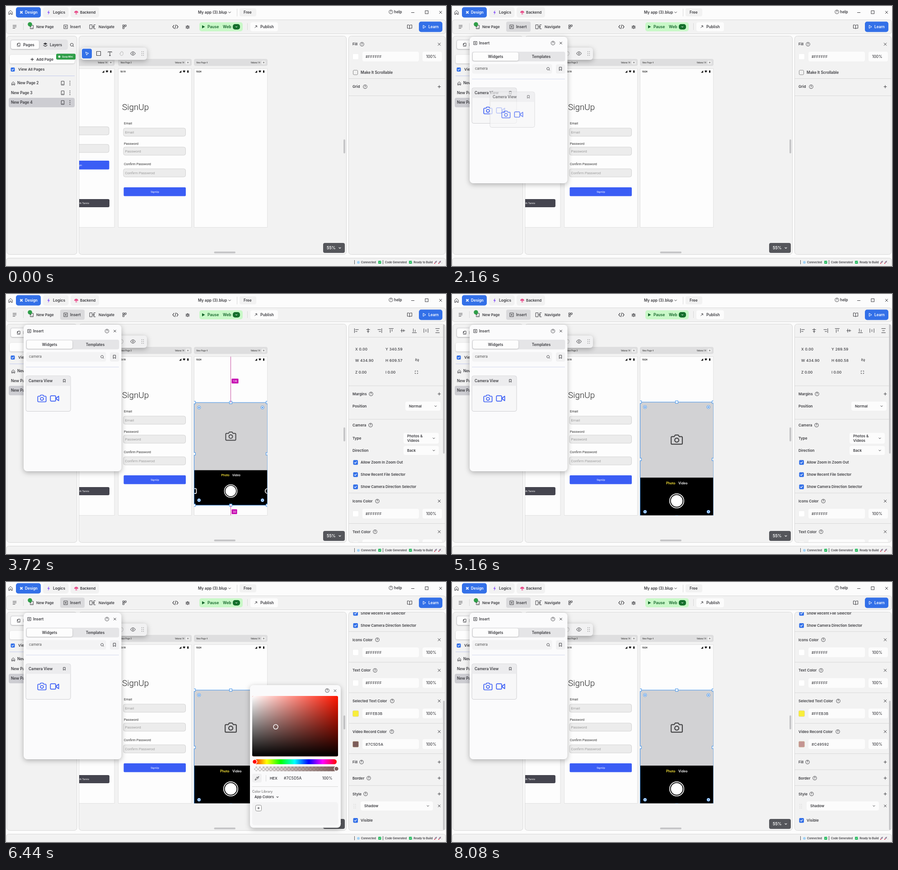
An HTML page that plays this animation: 974x575 px, repeating every 8120 ms.

```html
<!DOCTYPE html>
<html lang="en">
<head>
<meta charset="utf-8">
<title>App builder: camera view</title>
<style>
html, body { margin: 0; width: 100%; height: 100%; overflow: hidden; background: #fcfcfc; }
svg { display: block; width: 974px; height: 575px; font-family: Inter, sans-serif; }
text { white-space: pre; }
.app { font-family: Roboto, sans-serif; }
.float { filter: drop-shadow(0 3px 6px rgba(0, 0, 0, .28)); }
.lift { filter: drop-shadow(0 1px 1.5px rgba(0, 0, 0, .2)); }
</style>
</head>
<body>
<svg id="stage" viewBox="0 0 974 575"></svg>
<script>
const LOOP = 8120, BLUE = '#3370e8', ACTION = '#3a5df5', INK = '#3c3c40', PANEL = '#f2f2f2', EDGE = '#d8d8d8';

const PATHS = {
  home: 'M3 11L12 3l9 8v11h-6v-7H9v7H3z',
  x: 'M4 4L20 20M20 4L4 20',
  plus: 'M12 3v18M3 12h18',
  down: 'M4 8l8 8 8-8',
  camera: 'M23 19a2 2 0 0 1-2 2H3a2 2 0 0 1-2-2V8a2 2 0 0 1 2-2h4l2-3h6l2 3h4a2 2 0 0 1 2 2zM12 9a4 4 0 1 0 .1 0z',
  video: 'M3 5h10a2 2 0 0 1 2 2v10a2 2 0 0 1-2 2H3a2 2 0 0 1-2-2V7a2 2 0 0 1 2-2zM15 12l8-6v12z',
  phone: 'M6 1h12a2 2 0 0 1 2 2v18a2 2 0 0 1-2 2H6a2 2 0 0 1-2-2V3a2 2 0 0 1 2-2zM9 18h6',
  mark: 'M5 2h14v20l-7-6-7 6z',
  search: 'M11 3a8 8 0 1 0 .1 0zM17 17l5 5',
  code: 'M7 5L1 12l6 7M17 5l6 7-6 7M14 3l-4 18',
  insert: 'M2 2h20v20H2zM12 7v10M7 12h10',
  page: 'M8 8V3h12v18H4V14M1 9h9M5 5v9M11 17h4',
  eye: 'M1 12q11-16 22 0q-11 16-22 0zM12 9a3 3 0 1 0 .1 0z',
  menu: 'M3 5h18M3 12h18M3 19h12',
  nav: 'M1 5h9v14H1zM22 5h-6v14h6M10 12h7M14 8l4 4-4 4',
  blocks: 'M4 3h7v7H4zM14 3h7v7h-7zM4 13h7v8H4zM14 13h3',
  bug: 'M7 9h10v8a5 5 0 0 1-10 0zM8 9a4 4 0 0 1 8 0M2 7l5 4M22 7l-5 4M1 14h6M23 14h-6M2 21l5-4M22 21l-5-4M12 10v11',
  arrow: 'M4 20L20 4M8 4h12v12',
  book: 'M12 5q-4-3-11-2v16q7-1 11 2q4-3 11-2V3q-7-1-11 2v16',
  box: 'M3 3h18v18H3z',
  pointer: 'M4 3l16 7-7 3-3 7z',
  type: 'M3 6V3h18v3M12 3v18M8 21h8',
  hand: 'M6 13V7q2-2 3 0V4q2-2 3 0v-1q2-2 3 0v3q2-2 4 0v10q-2 6-8 6q-4 0-6-5l-3-4q1-2 4 0',
  link: 'M10 8H7a4 4 0 0 0 0 8h3M14 8h3a4 4 0 0 1 0 8h-3M4 3l16 18',
  expand: 'M2 8V2h6M16 2h6v6M22 16v6h-6M8 22H2v-6',
  pipette: 'M3 21l2-6 8-8 4 4-8 8zM11 5l8 8M16 7l4-4 2 2-4 4'
};
const ALIGN = ['M2 1v22M6 7h16M6 16h10', 'M12 1v22M3 7h18M6 16h12', 'M22 1v22M2 7h16M8 16h10', 'M1 2h22M7 6v16M16 6v10',
  'M1 12h22M7 3v18M16 6v12', 'M1 22h22M7 2v16M16 8v10', 'M2 2v20M22 2v20M12 6v12', 'M2 2h20M2 22h20M6 12h12'];

const rect = (x, y, w, h, fill, r = 0, stroke = 'none', more = '') =>
  `<rect x="${x}" y="${y}" width="${w}" height="${h}" rx="${r}" fill="${fill}" stroke="${stroke}" ${more}/>`;
const dot = (x, y, r, fill, stroke = 'none', sw = 1, more = '') =>
  `<circle cx="${x}" cy="${y}" r="${r}" fill="${fill}" stroke="${stroke}" stroke-width="${sw}" ${more}/>`;
const shape = (d, fill, more = '') => `<path d="${d}" fill="${fill}" ${more}/>`;
const line = (d, color = EDGE, sw = 1) => shape(d, 'none', `stroke="${color}" stroke-width="${sw}"`);
const text = (x, cy, s, size = 8.2, fill = INK, weight = 600, anchor = 'start', more = '') =>
  `<text x="${x}" y="${(cy + size * .36).toFixed(2)}" font-size="${size}" font-weight="${weight}" fill="${fill}" text-anchor="${anchor}" ${more}>${s}</text>`;
const icon = (name, x, y, size = 9, color = INK, sw = 1) =>
  `<path d="${PATHS[name] || name}" fill="none" stroke="${color}" stroke-width="${sw * 24 / size}" stroke-linejoin="round" transform="translate(${x - size / 2} ${y - size / 2}) scale(${size / 24})"/>`;
const group = (id, body, more = '') => `<g id="${id}" ${more}>${body}</g>`;
const help = (x, y) => dot(x, y, 4.1, 'none', INK, .9) + text(x, y, '?', 6.2, INK, 600, 'middle');
const check = (x, cy, s = 10.5) => rect(x, cy - s / 2, s, s, BLUE, 2) +
  icon('M5 12l5 5 9-10', x + s / 2, cy, s * .85, '#fff', s * .12);
const panel = (x, y, w, h) => rect(x, y, w, h, PANEL, 6, EDGE);
const rule = y => line(`M759 ${y}H972`);
const dots = (x, y) => [-4, 0, 4].map(d => dot(x, y + d, .9, INK)).join('');
const grip = (x, y, color) => [-4, 0, 4].map(d => dot(x - 1.8, y + d, .8, color) + dot(x + 1.8, y + d, .8, color)).join('');

function topBar() {
  return icon('home', 10, 14, 11) +
    rect(22, 2.5, 55, 23, BLUE, 5) + icon('x', 34, 14, 8, '#fff', 2) + text(42, 14, 'Design', 8.3, '#fff') +
    rect(82, 2.5, 56.5, 23, PANEL, 5) + shape('M95.5 9l-4 6h2.5l-1 4.5 4-6h-2.500z', '#8a55f7') + text(104, 14, 'Logics', 8.5) +
    rect(143, 2.5, 63, 23, PANEL, 5) + shape('M151 15a4.500 4.500 0 0 1 9 0z', '#e8508c') + rect(153.5, 15, 4, 4, '#ef9abc', 1) + text(164, 14, 'Backend', 8.2) +
    text(425, 14, 'My app (3).blup', 8.4) + icon('down', 495, 14, 8) + line('M511.500 6v17') +
    rect(517, 5, 37, 18, PANEL, 4) + text(526, 14, 'Free', 8.4) +
    help(852, 13) + text(859, 13, 'help', 8.4) + line('M897 14.500h7', INK) + rect(928, 10.5, 6.5, 6.5, 'none', 0, INK) + icon('x', 962, 14, 9);
}

function toolbar() {
  return panel(.5, 30.5, 973, 31) + icon('menu', 19, 46, 11) + line('M38.500 38v15') +
    rect(120, 34.5, 54, 22.5, '#dadadc', 4, 'none', 'id="insertHover"') +
    icon('page', 57, 46.5, 10) + dot(53, 40.5, 4.8, '#2f9e48') + text(67, 46, 'New Page', 8) +
    icon('insert', 132, 46, 9.5) + text(142, 46, 'Insert', 8.4) +
    icon('nav', 192, 46, 15) + text(205, 46, 'Navigate', 8.2) + icon('blocks', 262, 46, 11) +
    icon('code', 375, 46, 13, INK, 1.2) + icon('bug', 402, 46, 10) +
    rect(428, 36, 96, 20, '#c9f8c8', 5) + shape('M434 42.500l6.500 3.500-6.500 3.500z', '#14652a') + text(446, 46, 'Pause', 8.5, '#14652a') +
    text(480, 46, 'Web', 8.5, '#14652a') + rect(502, 40, 16, 12, '#15702c', 5) + icon('down', 510, 46, 6, '#fff') +
    line('M534.500 38v15') + rect(541, 36, 61, 20, '#fcfcfc', 4) + icon('arrow', 553, 46, 7) + text(563, 46, 'Publish', 8.4) +
    icon('book', 893.5, 46, 11) + rect(914, 34.5, 52, 23, BLUE, 5) +
    icon('M5 3l15 9-15 9z', 926, 46, 9, '#fff') + text(935, 46, 'Learn', 8.3, '#fff');
}

function pageRow(x, cy, name) {
  return text(x, cy, name, 8.3) + icon('phone', 125.5, cy, 9.5) + dots(141.5, cy);
}

function pagesPanel() {
  return panel(2, 66.5, 155, 483) + rect(9, 74, 128, 23, '#e4e4e6', 5) +
    rect(11, 76, 62, 19, '#fdfdfd', 4, 'none', 'class="lift"') + icon('page', 28, 85.5, 9) + text(38, 85.5, 'Pages', 8.4) +
    shape('M87 81l4.500 2.500-4.500 2.500-4.500-2.500zM82.500 86l4.500 2.500 4.500-2.500v1.500l-4.500 2.500-4.500-2.500z', INK) + text(97, 85.5, 'Layers', 8.4) + icon('search', 146, 86, 9.5) +
    rect(8, 108, 144, 19, '#fdfdfd', 4, 'none', 'class="lift"') + icon('plus', 58, 118, 9, INK, 1.3) + text(67, 118, 'Add Page', 8.2) +
    rect(111, 105.5, 43, 13, '#2f9e48', 3) + dot(118, 112, 2.5, '#d9f3df') + text(124, 112, 'Quop Mini', 4.9, '#fff') +
    check(10.5, 140.5, 9) + text(27, 140.5, 'View All Pages', 8.2) + line('M8 154.500H152', '#c3caeb') +
    rect(6, 203, 146, 21, '#cdcdd2', 4) + icon('home', 16, 171, 9) +
    pageRow(25, 170.5, 'New Page 2') + pageRow(11, 192, 'New Page 3') + pageRow(11, 213.5, 'New Page 4');
}

function phone(x, name, time, body = '') {
  const r = x + 162;
  return rect(x, 117.5, 162, 14.5, '#dededf', 3, '#d2d2d2', 'stroke-width=".5"') + text(x + 5, 125, name, 4.6, '#555', 500) +
    text(r - 16, 125, 'Velono 14', 4.6, '#444', 500, 'end') + rect(r - 12.5, 121, 8.5, 8, '#eee', 1.5) + icon('plus', r - 8, 125, 4.5, '#444', .7) +
    rect(x, 138.5, 162, 351, '#fdfdfd', 0, '#dcdcdc', 'stroke-width=".8"') + text(x + 4, 145, time, 4.6, '#111', 700) +
    shape(`M${r - 22.500} 142.500v5h-5zM${r - 19.500} 143.500q3-2 6 0l-3 4zM${r - 9.500} 142.500h3v5h-3z`, '#111') + body;
}

const field = (x, y, w, hint) => rect(x, y, w, 18, '#ececec', 4, '#cbcbcb', 'stroke-width=".8"') + text(x + 3.5, y + 9, hint, 8.1, '#777', 300);

function canvas() {
  const login = field(91, 267, 137, '') + field(91, 306, 137, '') + rect(91, 342, 137.5, 19.5, ACTION, 2) +
    text(168, 352, 'Login', 5.6, '#fff', 400, 'end') + rect(91, 427, 138, 18, '#45454f', 3) + text(184, 436, 'Sign in with Tarvio', 5.7, '#fff', 400, 'end');
  const signup = text(257, 223.5, 'SignUp', 18.9, '#222', 300) +
    [['Email', 259.5, 270, 'Email'], ['Password', 304, 312, 'Password'], ['Confirm Password', 349, 360, 'Confirm Passwrod']]
      .map(([label, cy, y, hint]) => text(261, cy, label, 7.3, '#333', 400) + field(260, y, 137.5, hint)).join('') +
    rect(260.5, 401, 137.5, 19.5, ACTION, 2) + text(329.5, 410.5, 'SignUp', 5.9, '#fff', 400, 'middle');
  return panel(161.5, 66.5, 592, 483) +
    `<g clip-path="url(#canvasClip)" class="app">${phone(78, 'New Page 2', '10:19', login)}${phone(248.7, 'New Page 3', '10:19', signup)}${phone(416.5, 'New Page 4', '10:24')}</g>` +
    widget() +
    rect(747, 295, 4, 31, '#c6c6c8', 2) + rect(460.5, 543, 47.5, 4, '#c6c6c8', 2) +
    `<g class="float">${rect(166, 92, 146, 27, '#f1f1f2', 6)}</g>` + rect(168, 94.5, 22, 21.5, BLUE, 4) + icon('pointer', 179.5, 105.5, 10, '#fff') +
    icon('box', 205, 105, 12, INK, 1.1) + icon('type', 230, 105.5, 11, INK, 1.1) + icon('hand', 256, 105, 11, '#bbb') + icon('eye', 281, 105, 12) + grip(302.5, 105, '#777') +
    rect(702, 524, 48, 22, '#55565b', 4) + text(710, 535, '55%', 8.8, '#fff') + icon('down', 739, 535, 7, '#fff', 1.2);
}

// Preview drawn around its top centre; the whole group scales with height.
function widget() {
  const content = icon('camera', 0, 83, 27, '#48484a', 2.2) +
    text(-3, 179.5, 'Photo', 7.3, '#ffeb3b', 600, 'end') + text(3.5, 179.5, 'Video', 7.3, '#fff') +
    dot(0, 218.5, 15.7, 'none', '#fff', 1.7) + dot(0, 218.5, 13, '#fff') +
    rect(-97, 212.5, 12, 12, 'none', 2, '#fff', 'stroke-width="1.8"') + dot(91, 218.5, 6, 'none', '#fff', 1.8);
  const handles = Array.from({ length: 8 }, () => rect(-2.8, -2.8, 5.6, 5.6, '#fff', 0, '#3d8fe8', 'class="handle"')).join('');
  const pins = Array.from({ length: 4 }, () => `<g class="pin">${dot(0, 0, 3.5, '#fff', '#3d8fe8') + dot(0, 0, 1.6, '#2f7fe0')}</g>`).join('');
  return group('widget', `<g clip-path="url(#pageClip)">
    ${rect(0, 0, 0, 0, '#d2d2d4', 0, 'none', 'id="view"')}${rect(0, 0, 0, 0, '#000', 0, 'none', 'id="bar"')}
    <g clip-path="url(#boxClip)">${group('content', content)}</g>
    ${rect(0, 0, 0, 0, 'none', 0, '#3d8fe8', 'id="frame"')}${handles}${pins}</g>` +
    group('guides', `<path id="guideLines" stroke="#c13b98" stroke-width=".9"/>` + ['topGap', 'endGap'].map(id =>
      group(id, rect(2, -5, 15, 10.5, '#c400ae', 1) + text(0, .3, '', 5.6, '#fff', 500, 'middle'))).join('')));
}

const colorRow = (cy, hex, fill, id = '') =>
  rect(767.5, cy - 6.5, 13, 13, fill, 2, fill === '#fff' ? '#eaeaea' : '#d8c8a0', `stroke-width=".6" ${id && `id="${id}Swatch"`}`) +
  rect(789, cy - 11, 125, 21.5, '#fcfcfc', 4) + text(796, cy, hex, 8.2, INK, 500, 'start', `${id && `id="${id}Hex"`} letter-spacing=".25"`) +
  rect(922, cy - 11, 43, 21.5, '#fcfcfc', 4) + text(930, cy, '100%', 8.3, INK, 500);
const heading = (cy, name, helpX, end) => text(767, cy, name, 8.1) + (helpX ? help(helpX, cy) : '') + (end ? icon(end, 959, cy, 9) : '');
const select = (x, cy, w, label, h = 20) => rect(x, cy - h / 2, w, h, '#fcfcfc', 4) +
  [].concat(label).map((s, i, all) => text(x + 8, cy + (i - (all.length - 1) / 2) * 10.5, s, 8)).join('') + icon('down', x + w - 11, cy, 7);

function pageProps() {
  return heading(84.5, 'Fill', 788, 'x') + colorRow(112, '#FFFFFF', '#fff') +
    rect(768.5, 142, 10, 10, 'none', 2, '#888') + text(785, 147, 'Make It Scrollable', 8.3) + rule(160.5) +
    heading(178.5, 'Grid', 795, 'plus') + rule(198.5);
}

function cameraProps() {
  const value = (id, x, cy) => text(x, cy, '', 8.2, INK, 500, 'start', `id="${id}" letter-spacing=".25"`);
  return ALIGN.map((d, i) => icon(d, 776 + i * 25.6, 81, 11)).join('') + rule(95.5) +
    value('vX', 773, 122) + value('vY', 840, 122) + value('vW', 773, 147.5) + value('vH', 840, 147.5) +
    text(773, 173, 'Z 0.00', 8.2, INK, 500) + text(840, 173, 'I 0.00', 8.2, INK, 500) + icon('link', 910, 146, 10) + icon('expand', 908.5, 173, 7) + rule(203) +
    heading(221, 'Margins', 808, 'plus') + text(767, 248, 'Position', 8.1) + select(884, 248, 78, 'Normal') + rule(277) +
    heading(290, 'Camera', 807) + text(767, 319.5, 'Type', 8.1) + select(880, 319, 78, ['Photos &amp;', 'Videos'], 24) +
    text(767, 346, 'Direction', 8.1) + select(880, 346, 78, 'Back') +
    ['Allow Zoom In Zoom Out', 'Show Recent File Selector', 'Show Camera Direction Selector']
      .map((s, i) => check(768.5, 372.5 + 27 * i) + text(785, 372.5 + 27 * i, s, 7.9)).join('') +
    [['Icons Color', 822, '#FFFFFF', '#fff'], ['Text Color', 817, '#FFFFFF', '#fff'], ['Selected Text Color', 855, '#FFEB3B', '#f8ee3b'],
      ['Video Record Color', 854, '', '#c49592', 'record']].map(([s, hx, hex, fill, id], i) =>
      rule(440 + 67.6 * i) + heading(458 + 67.7 * i, s, hx, 'x') + colorRow(486 + 67.7 * i, hex, fill, id)).join('') +
    rule(710) + heading(728.5, 'Fill', 787, 'plus') + rule(745.5) + heading(764, 'Border', 803, 'plus') + rule(780.5) +
    heading(799, 'Style', 796, 'plus') + grip(772, 826, '#ccc') + select(785, 825.5, 160, 'Shadow') + icon('x', 959, 825.5, 8) +
    check(768.5, 857.5) + text(785, 857.5, 'Visible', 8.2);
}

function cameraCard() {
  return rect(0, 0, 99, 78.5, '#f7f7f8', 4, '#cfcfd2') + shape('M.500 22V4q0-3.500 3.500-3.500H95q3.500 0 3.500 3.500V22z', '#ececee') +
    text(6, 11, 'Camera View', 8.3) + icon('mark', 85, 11, 7.5) + icon('camera', 35.5, 50, 20, ACTION, 1.7) + icon('video', 63.5, 50, 20, ACTION, 1.7);
}

function insertPanel() {
  const dialog = rect(44, 181, 99, 78.5, '#f7f7f8', 4, '#cfcfd2') + shape('M44.500 203V185q0-3.500 3.500-3.500h91q3.500 0 3.500 3.500v18z', '#ececee') +
    text(50, 192, 'Multi choice dialog', 8.3) + icon('mark', 134, 192, 7.5) + shape('M54 259v-46q0-3 3-3h73q3 0 3 3v46z', '#e8e8ea') +
    text(60, 219.5, 'Dialog Title', 6, '#333', 500) + check(58.5, 237, 5) + text(68, 237.2, 'Option 1', 4, '#555', 400) + check(58.5, 252, 5) + text(68, 252.2, 'Option 2', 4, '#555', 400);
  return `<g class="float">${rect(39, 68, 216.5, 324, '#fbfbfc', 8)}</g>` + icon('insert', 51.5, 82, 8.5) + text(60, 82, 'Insert', 8.3) + help(223.5, 82) + icon('x', 241, 82, 8) +
    rect(44, 101, 206.5, 21.5, '#e5e5e7', 4) + rect(46, 102.5, 101, 18.5, '#fdfdfd', 4, 'none', 'class="lift"') +
    text(96.5, 112, 'Widgets', 8.4, INK, 600, 'middle') + text(197.5, 112, 'Templates', 8.3, INK, 600, 'middle') +
    rect(44.5, 128.5, 177, 21, '#f3f3f4', 4, 'none', 'id="searchBox"') + text(51, 138.5, '', 7.9, '#555', 400, 'start', 'id="query"') +
    `<path id="caret" d="M0 134v9.500" stroke="#222" stroke-width=".9"/>` + icon('search', 213, 139, 8.5) +
    rect(230, 129, 20.5, 20.5, '#f1f1f2', 4) + icon('mark', 240, 139, 9) + line('M44 161.500H250', '#d3d8ee') +
    group('dialogCard', dialog) + group('cameraCard', cameraCard());
}

function picker() {
  return `<g class="float">${rect(540, 228, 201, 315.5, '#fafafb', 8)}</g>` + help(711, 240) + icon('x', 728.5, 240.5, 8) +
    rect(545, 252, 190, 133.5, '#f00', 3, 'none', 'id="hueField"') + rect(545, 252, 190, 133.5, 'url(#white)', 3) + rect(545, 252, 190, 133.5, 'url(#black)', 3) +
    dot(0, 0, 5, 'none', '#fff', 1.5, 'id="knob"') + rect(546, 392, 186, 11, 'url(#rainbow)', 5.5) + dot(550.5, 397.5, 5, '#f00', '#fff', 1.5) +
    rect(549, 408, 183, 10.5, 'url(#checker)', 5) + rect(549, 408, 183, 10.5, 'url(#alpha)', 5) + dot(731.5, 413, 5, '#888', '#fff', 1.5, 'id="alphaKnob"') +
    rect(545, 424, 21, 19.5, '#f0f0f1', 4) + icon('pipette', 555.5, 434, 11) + line('M575.500 427v14') + text(584, 434, 'HEX', 8.1) +
    text(615, 434, '', 8.3, INK, 500, 'start', 'id="pickHex" letter-spacing=".25"') + text(700, 434, '100%', 8.3, INK, 500) + line('M545 452.500H735') +
    text(545, 463.5, 'Color Library', 7.3, '#777', 500) + text(550, 475.5, 'App Colors', 8) + icon('down', 601, 475.5, 6.5) +
    rect(545, 487, 190, 51, '#f3f3f4', 5) + rect(552.5, 493.5, 13, 13, '#fcfcfc', 3, '#888') + icon('plus', 559, 500, 7);
}

function statusBar() {
  const done = x => rect(x, 563.5, 6.5, 6.5, '#22b95c', 1) + icon('M4 12l5 6 11-12', x + 3.25, 566.7, 5, '#fff', .9);
  const rocket = x => shape(`M${x + 3} 563.500q-4 0-5 3.500l1.500 1.500q3.500-1 3.500-5z`, '#8d93ab') + dot(x - 2, 569, 1.2, '#e5485c') + dot(x + 1, 566, .8, '#e5485c');
  return panel(.5, 557.5, 973, 19) + line('M771.500 562v9M834.500 562v9', '#555') + dot(780, 567, 3, '#a2d3f7') +
    text(786, 567, 'Connected', 6.2) + done(824) + text(839, 567, 'Code Generated', 6.1) + done(892) + text(899, 567, '. Ready to Build', 6.1) +
    rocket(951) + rocket(960) + text(964, 567, '.', 6.1);
}

const stops = list => list.map((s, i) => `<stop offset="${i / (list.length - 1)}" stop-color="${s[0]}" stop-opacity="${s[1]}"/>`).join('');
const clip = (id, x, y, w, h) => `<clipPath id="${id}">${rect(x, y, w, h, '#000', 0, 'none', `id="${id}Rect"`)}</clipPath>`;
const stage = document.getElementById('stage');
stage.innerHTML = `<defs>
  ${clip('canvasClip', 162, 67, 591, 482)}${clip('pageClip', 416, 138, 162.5, 351.5)}${clip('boxClip', 0, 0, 0, 0)}${clip('propsClip', 759, 67, 213, 482)}
  <linearGradient id="white">${stops([['#fff', 1], ['#fff', 0]])}</linearGradient>
  <linearGradient id="black" x2="0" y2="1">${stops([['#000', 0], ['#000', 1]])}</linearGradient>
  <linearGradient id="rainbow">${stops(['#f00', '#ff0', '#0f0', '#0ff', '#00f', '#f0f', '#f00'].map(c => [c, 1]))}</linearGradient>
  <linearGradient id="alpha">${stops([['#888', 0], ['#888', 1]])}</linearGradient>
  <pattern id="checker" width="8" height="8" patternUnits="userSpaceOnUse">${rect(0, 0, 8, 8, '#fff') + rect(0, 0, 4, 4, '#d0d0d0') + rect(4, 4, 4, 4, '#d0d0d0')}</pattern>
</defs>` + topBar() + toolbar() + pagesPanel() + canvas() + panel(758.5, 66.5, 214, 483) +
  `<g clip-path="url(#propsClip)">${group('pageProps', pageProps())}${group('cameraProps', group('scroll', cameraProps()) + rect(967.5, 67, 3.5, 286, '#c4c4c6', 2, 'none', 'id="thumb"'))}</g>` +
  statusBar() + group('insertPanel', insertPanel()) + group('ghost', cameraCard(), 'opacity=".7"') + group('picker', picker());

const $ = id => document.getElementById(id);
const set = (el, attrs) => { for (const k in attrs) el.setAttribute(k, attrs[k]); };
const show = (id, on) => { $(id).style.display = on ? '' : 'none'; };
const place = (el, x, y) => el.setAttribute('transform', `translate(${x} ${y})`);
const handles = [...document.querySelectorAll('.handle')], pins = [...document.querySelectorAll('.pin')];
const alphaStops = document.querySelectorAll('#alpha stop');

// Eased values between keys of the form [time, ...values].
function track(t, keys) {
  const i = keys.findIndex(k => k[0] > t);
  if (i === 0) return keys[0].slice(1);
  if (i < 0) return keys[keys.length - 1].slice(1);
  const a = keys[i - 1], b = keys[i], p = (t - a[0]) / (b[0] - a[0]), e = p * p * (3 - 2 * p);
  return a.slice(1).map((v, n) => v + (b[n + 1] - v) * e);
}

// Widget box in design units: x, y, width, height.
const BOX = [[2960, 28.69, 340.59, 200, 300], [3180, 0, 340.59, 228.69, 300], [3240, 0, 340.59, 228.69, 300],
  [3480, 0, 340.59, 434.9, 609.57], [3520, 0, 340.59, 434.9, 609.57], [3700, 0, 272.2, 434.9, 609.57],
  [3880, 0, 272.2, 434.9, 609.57], [3980, 0, 269.59, 434.9, 609.57], [4280, 0, 269.59, 434.9, 609.57], [4640, 0, 269.59, 434.9, 680.58]];
// Hue, saturation, brightest channel.
const COLOR = [[6040, 4.1, .7787, 244], [6360, 5.294, .2742, 124], [6560, 5.294, .2742, 124], [7080, 3.6, .2551, 196]];
const KEYS = [1080, 1200, 1360, 1480, 1600, 1720];
const UNIT = .3725;

function drawWidget(t) {
  const [ux, uy, uw, uh] = track(t, BOX);
  const x = 416.5 + ux * UNIT, y = 138.6 + uy * UNIT, w = uw * UNIT, h = uh * UNIT, cx = x + w / 2, split = h * .659;
  set($('view'), { x, y, width: w, height: split });
  set($('bar'), { x, y: y + split, width: w, height: h - split });
  set($('frame'), { x, y, width: w, height: h });
  set($('boxClipRect'), { x, y, width: w, height: h });
  set($('content'), { transform: `translate(${cx} ${y}) scale(${h / 253.5})` });
  handles.forEach((el, i) => {
    const n = i < 4 ? i : i + 1;
    place(el, x + w * (n % 3) / 2, y + h * Math.floor(n / 3) / 2);
  });
  pins.forEach((el, i) => place(el, i % 2 ? x + w - 10.8 : x + 10.8, i > 1 ? y + h - 11 : y + 11));

  const moving = t >= 3520 && t < 4000, end = y + h;
  show('guides', moving);
  set($('guideLines'), { d: `M${cx} 138.500V${y}M${cx} ${end}V${Math.max(end, 489.5)}` });
  [['topGap', 138.5, y, uy / 2], ['endGap', end, 489.5, (942 - uy - uh) / 2]].forEach(([id, a, b, gap]) => {
    const el = $(id), label = String(Math.round(gap)), width = label.length > 2 ? 15 : 12;
    place(el, cx, (a + b) / 2 + 3);
    set(el.firstChild, { width });
    set(el.lastChild, { x: 2 + width / 2 });
    el.lastChild.textContent = label;
    el.style.display = gap > 0 ? '' : 'none';
  });
  const values = { X: ux, Y: t < 4000 ? 340.59 : uy, W: uw, H: uh };
  for (const k in values) $('v' + k).textContent = `${k} ${values[k].toFixed(2)}`;
}

function drawColor(t) {
  const [hue, sat, max] = track(t, COLOR), min = max * (1 - sat);
  const hex = '#' + [max, min + (max - min) * hue / 60, min].map(v => Math.round(v).toString(16).padStart(2, '0')).join('').toUpperCase();
  set($('recordSwatch'), { fill: hex });
  set($('knob'), { cx: 545 + sat * 190, cy: 252 + 133 * (1 - max / 255) });
  set($('hueField'), { fill: `hsl(${hue},100%,50%)` });
  set($('alphaKnob'), { fill: hex });
  alphaStops.forEach(s => set(s, { 'stop-color': hex }));
  $('recordHex').textContent = $('pickHex').textContent = hex;
}

function drawSearch(t) {
  const typed = 'camera'.slice(0, KEYS.filter(k => t >= k).length), focus = t >= 880 && t < 2000;
  const query = $('query');
  query.textContent = typed || (focus ? '' : 'Search');
  set($('searchBox'), { stroke: focus ? '#6f8af2' : 'none', fill: focus ? '#fdfdfe' : '#f3f3f4' });
  show('caret', focus);
  if (focus) place($('caret'), 51.5 + (typed ? query.getComputedTextLength() : 0), 0);
  const filtered = typed.length > 2;
  show('dialogCard', !filtered);
  place($('cameraCard'), filtered ? 44 : 151, 181);
}

function render(t) {
  show('insertHover', t >= 320);
  show('insertPanel', t >= 440);
  $('insertPanel').style.opacity = Math.min(1, (t - 400) / 120);
  if (t >= 440) drawSearch(t);

  show('ghost', t >= 2080 && t < 2520);
  place($('ghost'), ...track(t, [[2080, 44, 181], [2480, 420, 265]]));

  const placed = t >= 2520;
  show('widget', placed);
  show('cameraProps', placed);
  show('pageProps', !placed);
  if (placed) drawWidget(t);

  const [scroll] = track(t, [[5240, 0], [5720, 330.3]]);
  place($('scroll'), 0, -scroll);
  place($('thumb'), 0, scroll * 195.5 / 330.3);

  show('picker', t >= 5880 && t < 7560);
  drawColor(t);
}

function tick() {
  render(performance.now() % LOOP);
  requestAnimationFrame(tick);
}
tick();
</script>
</body>
</html>
```
